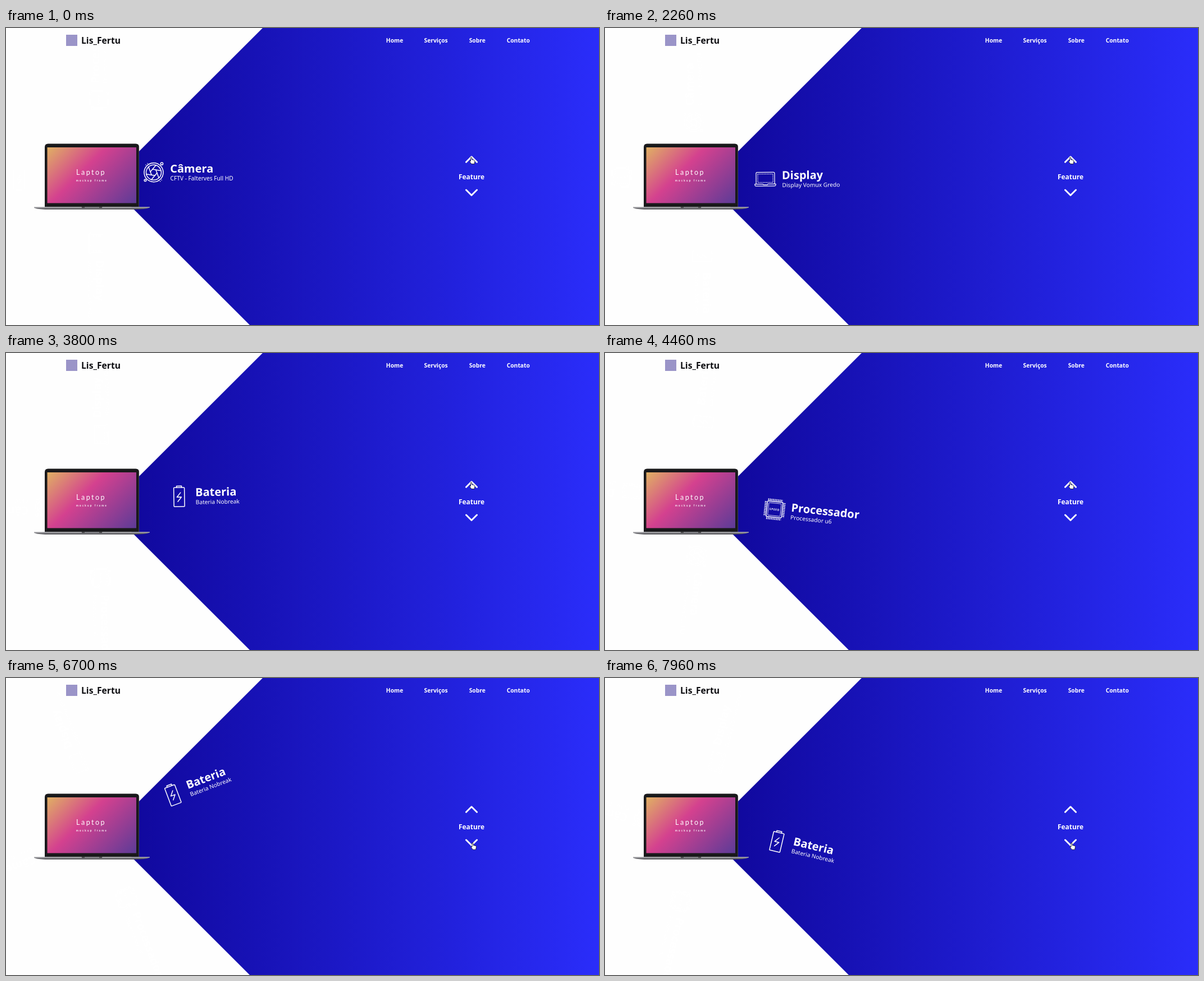
An HTML page that plays this animation: 1056 by 530 pixels, repeating every 8000 ms.

```html
<!DOCTYPE html>
<html lang="pt">
<head>
<meta charset="utf-8">
<title>Landing page</title>
<style>
  html, body { margin: 0; width: 100%; height: 100%; overflow: hidden; background: #fefefe; }
  svg { display: block; width: 1056px; height: 530px; }
  text { font-family: "Noto Sans", "Open Sans", sans-serif; }
  .bold { font-weight: 700; fill: #fff; }
  .nav { font-size: 10.3px; }
  .title { font-size: 20px; }
  .sub { font-size: 10.2px; fill: #fff; }
  .screen { font-family: Lato, sans-serif; fill: #fff; }
  .icon { fill: none; stroke: #fff; stroke-width: 1.5; stroke-linejoin: round; stroke-linecap: round; }
  .chevron { fill: none; stroke: #fff; stroke-width: 3; stroke-linecap: round; stroke-linejoin: round; }
</style>
</head>
<body>
<svg viewBox="0 0 1056 530">
  <defs>
    <linearGradient id="blue" gradientUnits="userSpaceOnUse" x1="180" y1="0" x2="1056" y2="0">
      <stop offset="0" stop-color="#0f0698"/>
      <stop offset="1" stop-color="#2a2dfa"/>
    </linearGradient>
    <linearGradient id="wallpaper" gradientUnits="userSpaceOnUse" x1="73" y1="213" x2="201.5" y2="341.5">
      <stop offset="0" stop-color="#e0b163"/>
      <stop offset=".41" stop-color="#d4418f"/>
      <stop offset="1" stop-color="#5e3b97"/>
    </linearGradient>
    <linearGradient id="metal" x1="0" y1="0" x2="0" y2="1">
      <stop offset="0" stop-color="#b4b4b8"/>
      <stop offset=".4" stop-color="#8a8a8e"/>
      <stop offset="1" stop-color="#3c3c40"/>
    </linearGradient>
  </defs>

  <rect width="1056" height="530" fill="#fefefe"/>
  <path d="M457 0H1056V530H434L180.5 276.5Z" fill="url(#blue)"/>

  <g id="wheel"></g>

  <g id="laptop">
    <path d="M69 319.5V212.5Q69 206.5 75 206.5H231Q237 206.5 237 212.5V319.5Z" fill="#19191b"/>
    <path d="M236.6 212V319" stroke="#55555c" stroke-width=".7"/>
    <rect x="73.5" y="213" width="158.5" height="99.5" fill="url(#wallpaper)"/>
    <text class="screen" x="125" y="262" font-size="12.5" letter-spacing="2.5">Laptop</text>
    <text class="screen" x="125" y="273.6" font-size="4.6" font-weight="700" letter-spacing="2.2">mockup frame</text>
    <path d="M50 319.3H256V320.6C250 323 240 323.7 232 323.7H74C62 323.7 54 322.6 50 320.9Z" fill="url(#metal)"/>
    <path d="M134 319.3H172Q171 321.2 168 321.2H138Q135 321.2 134 319.3Z" fill="#77777c"/>
    <path d="M135 320.3H140M166 320.3H171" stroke="#333" stroke-width="1.4"/>
  </g>

  <rect x="107" y="12" width="20" height="20" fill="#9a94c8"/>
  <text x="134" y="28" font-size="15.7" font-weight="700" fill="#0c0c10">Lis_Fertu</text>
  <g class="bold nav">
    <text x="676.8" y="25.8">Home</text>
    <text x="744.5" y="25.8">Serviços</text>
    <text x="824.7" y="25.8">Sobre</text>
    <text x="891.7" y="25.8">Contato</text>
  </g>

  <path class="chevron" d="M819.5 239.3L829 229.8L838.5 239.3M819.5 289L829 298.5L838.5 289"/>
  <text class="bold" x="829" y="270" font-size="11.9" text-anchor="middle">Feature</text>
  <path id="hand" fill="#fff" stroke="#111" stroke-width=".8" stroke-linejoin="round"
    d="M2.2 7V1.2Q3.2 0 4.2 1.2V5L8.5 6Q9.8 6.5 9.6 8L8.8 12.8H3.6L.4 8.6Q.3 7 2.2 8Z"/>
</svg>

<script>
const LOOP = 8000, TURN = 1000;
const CENTER = { x: 166, y: 265 };
const byId = id => document.getElementById(id);

const blades = [0, 1, 2, 3, 4, 5]
  .map(k => `<path d="M6 0L-1.7 13.4" transform="rotate(${k * 60 + 10})"/>`).join('');

const cameraIcon = `<g transform="translate(263 257.7)">
  <circle r="17"/><circle r="13.5"/>${blades}
  <circle cx="14.5" cy="-15.5" r="2.1"/><circle cx="-15" cy="14" r="1.8"/>
  <path d="M-14 -13.5h.1M-11 -16h.1M14 13.5h.1M11.5 16h.1"/></g>`;

const laptopIcon = `<g stroke-width="1.2">
  <path d="M269 279V260.5Q269 258.5 271 258.5H300Q302 258.5 302 260.5V279"/>
  <rect x="272" y="261.5" width="27" height="15" stroke-width=".9" stroke-dasharray="1 1.5"/>
  <path d="M266.8 279.4H281L282 280.6H289L290 279.4H304V281.2Q303.4 283 301.5 283H269Q267 283 266.8 281.2Z"/></g>`;

const batteryIcon = `<rect x="299" y="242.5" width="19" height="34" rx="1"/>
  <path d="M304 242.3V239.7H313V242.3M311 251.5L304.5 259.5H312.5L306 267.5"/>`;

const chipIcon = `<g stroke-linecap="butt">
  <rect x="288.7" y="250.7" width="27.8" height="27.8" rx="2"/>
  <rect x="291.4" y="253.4" width="22.4" height="22.4" rx="1" stroke-width=".8"/>
  <path stroke-width="3.4" stroke-dasharray="1.5 1.42"
    d="M289.5 247.7H316M289.5 281.5H316M285.7 251.5V278M319.5 251.5V278"/></g>
  <text x="302.6" y="266.4" font-size="5" font-weight="700" text-anchor="middle"
    textLength="" letter-spacing=".6" fill="#fff" stroke="none">SPEED</text>`.replace('textLength="" ', '');

const features = [
  { title: 'Câmera', sub: 'CFTV - Falterves Full HD', x: 292.2, y: 258, icon: cameraIcon },
  { title: 'Display', sub: 'Display Vomux Gredo', x: 315, y: 271, icon: laptopIcon },
  { title: 'Bateria', sub: 'Bateria Nobreak', x: 337.4, y: 258.4, icon: batteryIcon },
  { title: 'Processador', sub: 'Processador u6', x: 332, y: 265, icon: chipIcon }
];

byId('wheel').innerHTML = features.map((f, i) => `
  <g transform="rotate(${i * 90} ${CENTER.x} ${CENTER.y})">
    <g class="icon">${f.icon}</g>
    <text class="bold title" x="${f.x}" y="${f.y}">${f.title}</text>
    <text class="sub" x="${f.x + .3}" y="${f.y + 14.2}">${f.sub}</text>
  </g>`).join('');

// Quarter turns: start time and direction.
const turns = [[226, -1], [2250, -1], [3780, -1], [6232, 1], [7830, 1]];

const clamp = v => Math.min(1, Math.max(0, v));
const bezier = (a, b, s) => 3 * a * s * (1 - s) ** 2 + 3 * b * s * s * (1 - s) + s ** 3;

// The CSS "ease" curve.
function ease(p) {
  if (p <= 0 || p >= 1) return clamp(p);
  let lo = 0, hi = 1;
  for (let i = 0; i < 24; i++) {
    const mid = (lo + hi) / 2;
    if (bezier(.25, .25, mid) < p) lo = mid; else hi = mid;
  }
  return bezier(.1, 1, lo);
}

function draw(t) {
  const angle = turns.reduce((sum, [start, dir]) => sum + dir * 90 * ease((t - start) / TURN), 0);
  byId('wheel').setAttribute('transform', `rotate(${angle} ${CENTER.x} ${CENTER.y})`);

  const p = clamp((t - 5130) / 330);
  const glide = p * p * (3 - 2 * p);
  byId('hand').setAttribute('transform', `translate(${825.3 + 2.5 * glide} ${229.8 + 63.6 * glide})`);
}

const begin = performance.now();
function tick() {
  draw((performance.now() - begin) % LOOP);
  requestAnimationFrame(tick);
}
tick();
</script>
</body>
</html>
```
